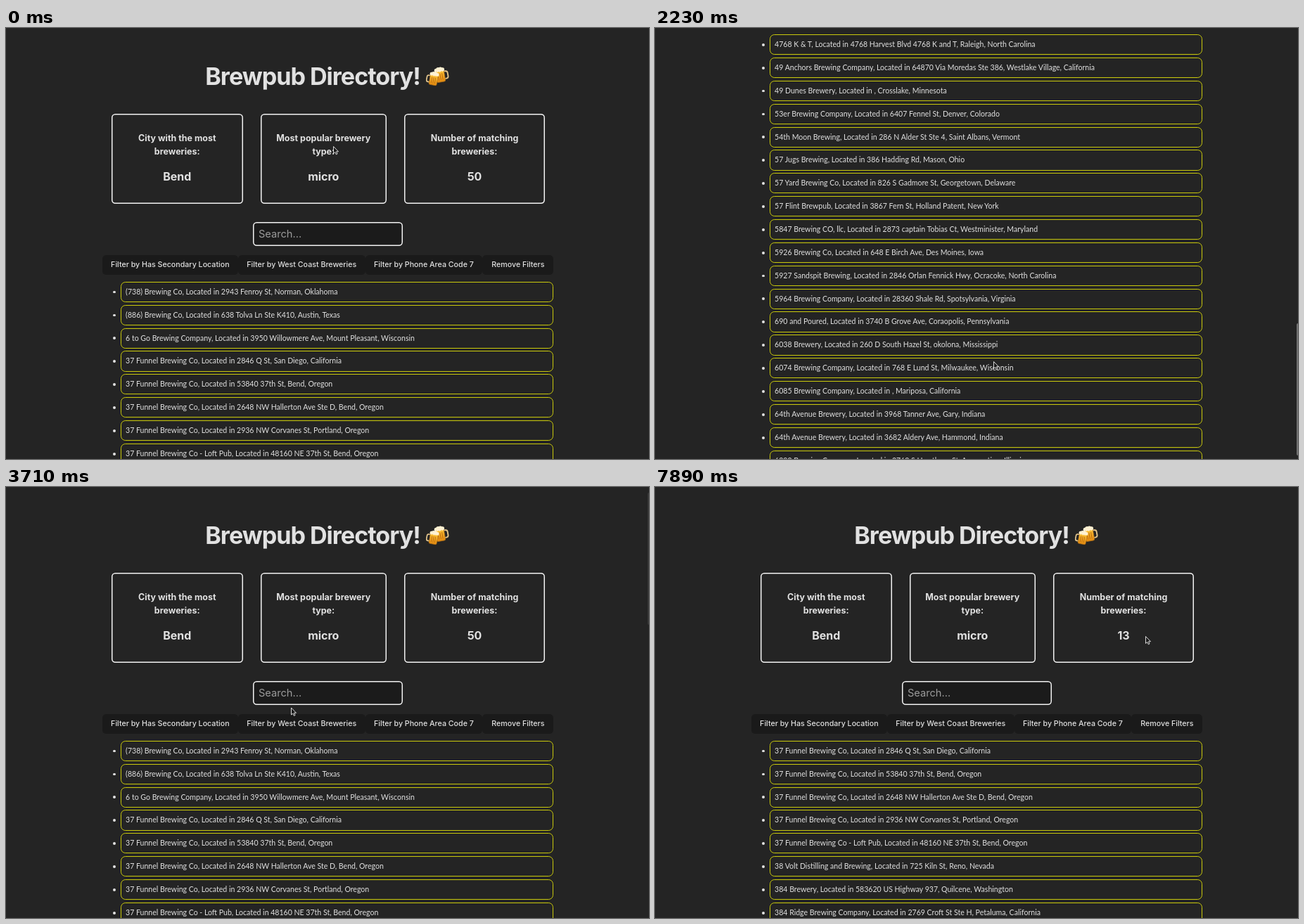
An HTML page for the animation above (8000 ms loop, 914 by 613 pixels).

```html
<!DOCTYPE html>
<html lang="en">
<head>
<meta charset="utf-8">
<title>Brewpub Directory</title>
<style>
  html, body { margin: 0; width: 100%; height: 100%; overflow: hidden; background: #242424; }
  #stage { position: relative; width: 914px; height: 613px; overflow: hidden; background: #242424;
    color: #e1e1e1; font-family: Inter, sans-serif; font-optical-sizing: none; }
  #stage * { box-sizing: border-box; }
  #page, #page div, .mugs, .top, #thumb, #cursor { position: absolute; }
  #page { left: 0; top: 0; width: 914px; }
  #page div { white-space: nowrap; }
  .title { left: 236px; width: 400px; top: 44px; line-height: 50px; text-align: center;
    font-size: 34.13px; font-weight: 700; letter-spacing: -.03em; }
  .mugs { left: 597px; top: 53px; }
  .card, .search { box-shadow: inset 0 0 0 1.5px #f2f2f2; border-radius: 5.5px; }
  .card { top: 122.3px; height: 127.8px; text-align: center; font-weight: 700; }
  .card div { left: 0; right: 0; }
  .card .label { top: 25.6px; font-size: 12.48px; line-height: 18.72px; white-space: pre-line !important; }
  .card .value { top: 76.4px; font-size: 16px; line-height: 24px; }
  .search { left: 351.3px; top: 276px; width: 213px; height: 34px; background: #1b1b1b; color: #9b9b9b;
    padding-left: 7.6px; font-size: 14.67px; line-height: 34px; }
  .button { top: 322.7px; height: 28px; border: 1px solid transparent; border-radius: 5.3px;
    background: #1a1a1a; text-align: center; font-size: 10.67px; font-weight: 500; line-height: 26px; }
  .row { left: 163.3px; width: 615.2px; height: 29.2px; border: 1px solid #c9c90c; border-radius: 6.7px;
    padding-left: 5.8px; font: 10.55px/27px Lato, sans-serif; }
  .row::before { content: ""; position: absolute; left: -12.6px; top: 11.9px; width: 3.8px; height: 3.8px;
    border-radius: 50%; background: #e1e1e1; }
  .top { left: 0; top: 0; width: 914px; height: 5px; background: #242424; }
  #thumb { left: 911.5px; width: 2.5px; height: 188px; border-radius: 2px 0 0 2px; background: #727272; }
  #cursor { left: 0; top: 0; overflow: visible; }
</style>
</head>
<body>
<div id="stage">
  <div id="page">
    <div class="title">Brewpub Directory!</div>
    <svg class="mugs" width="34" height="32">
      <defs>
        <linearGradient id="beer" x2="0" y2="1">
          <stop offset="0" stop-color="#ffc93c"/><stop offset="1" stop-color="#e2890f"/>
        </linearGradient>
        <g id="mug">
          <path d="M1 6h-3q-3 0-3 3v5q0 3 3 3h3" fill="none" stroke="#e3c58d" stroke-width="2"/>
          <path d="M0 3h13v16q0 2-2 2H2q-2 0-2-2z" fill="url(#beer)" stroke="#b4731b" stroke-width=".7"/>
          <path d="M3.5 8v10M6.5 8v10M9.5 8v10" stroke="#b9690d" stroke-width="1"/>
          <path d="M-1 4q-1-4 3-4 2-2 4.500-1 3-1 4.500 1 4 0 3 4.500-1 2-3 0-1 2.500-3 .5-2 2-4 0-4 2-5-1z" fill="#fff1d2"/>
        </g>
      </defs>
      <use href="#mug" transform="translate(24.500 3) rotate(-10) scale(-.95 .95)"/>
      <use href="#mug" transform="translate(7 9.500) rotate(10) scale(.85)"/>
    </svg>
    <div id="list"></div>
  </div>
  <div class="top"></div>
  <div id="thumb"></div>
  <svg id="cursor" width="14" height="16">
    <path id="arrow" d="M.5.5v10l2.300-2 1.500 3.300 1.700-.8-1.500-3.200h3z" fill="#1a1a1a" stroke="#eee" stroke-width=".9"/>
    <path id="hand" d="M2.500 1q1.300-1.200 1.800.5l.7 3 3 .7q1.700.5 1.400 2.300l-.8 3.500h-4L.8 7.500q.2-1.500 2.200-.2z" fill="#f4f4f4" stroke="#161616" stroke-width=".7"/>
  </svg>
</div>
<script>
const $ = id => document.getElementById(id);
const page = $('page'), list = $('list'), thumb = $('thumb');

// name | street | place
const pubs = `(738) Brewing Co|2943 Fenroy St|Norman, Oklahoma
(886) Brewing Co|638 Tolva Ln Ste K410|Austin, Texas
6 to Go Brewing Company|3950 Willowmere Ave|Mount Pleasant, Wisconsin
37 Funnel Brewing Co|2846 Q St|San Diego, California
37 Funnel Brewing Co|53840 37th St|Bend, Oregon
37 Funnel Brewing Co|2648 NW Hallerton Ave Ste D|Bend, Oregon
37 Funnel Brewing Co|2936 NW Corvanes St|Portland, Oregon
37 Funnel Brewing Co - Loft Pub|48160 NE 37th St|Bend, Oregon
37 Funnel Brewing Co|847 Pelling St|Boise, Idaho
37 Funnel Brewing Co|5290 Larkem St|Denver, Colorado
38 Volt Distilling and Brewing|725 Kiln St|Reno, Nevada
38-74 Brewing Company|620 Cobble St|Knox, Indiana
384 Brewery|583620 US Highway 937|Quilcene, Washington
384 Ridge Brewing Company|2769 Croft St Ste H|Petaluma, California
387 East Brewing Company|2860 Quarrel St|Castle Rock, Colorado
39M Brewing|3748 Tellis Rd|Parker, Colorado
39th Parish Brewing Company|846 Brannet St|Abington, Massachusetts
43 Over Brewing Company|7382 Dorrin Rd|Houston, Texas
4377 Brewery|260 Fallow St|John Day, Oregon
46 Plots Brewing Company|Uncharted Lane|Killeshin, Laois
46 Doors Brewing Company|73 Emberly Dr|Williamsville, New York
46 South Brewing Company|4820 E Tamsin Ave|Gilbert, Arizona
46 South Brewing Company|386 N Orrin St|Mesa, Arizona
468 South Brewing|7620 Corder St|Bellingham, Washington
469 Brewing|4863 Salter Rd|Jackson, Michigan
47Radian Brewing|820 Maple St|Louisville, Colorado
48 Over Brewery|8374 Harbin Rd|Crescent City, California
48 Ribbons Brewery|276 Ginnet St|Savannah, Georgia
48 Quarters Brewing|6830 Tolland Ave|Milwaukee, Wisconsin
4768 K & T|4768 Harvest Blvd 4768 K and T|Raleigh, North Carolina
49 Anchors Brewing Company|64870 Via Moredas Ste 386|Westlake Village, California
49 Dunes Brewery||Crosslake, Minnesota
53er Brewing Company|6407 Fennel St|Denver, Colorado
54th Moon Brewing|286 N Alder St Ste 4|Saint Albans, Vermont
57 Jugs Brewing|386 Hadding Rd|Mason, Ohio
57 Yard Brewing Co|826 S Gadmore St|Georgetown, Delaware
57 Flint Brewpub|3867 Fern St|Holland Patent, New York
5847 Brewing CO, llc|2873 captain Tobias Ct|Westminister, Maryland
5926 Brewing Co|648 E Birch Ave|Des Moines, Iowa
5927 Sandspit Brewing|2846 Orlan Fennick Hwy|Ocracoke, North Carolina
5964 Brewing Company|28360 Shale Rd|Spotsylvania, Virginia
690 and Poured|3740 B Grove Ave|Coraopolis, Pennsylvania
6038 Brewery|260 D South Hazel St|okolona, Mississippi
6074 Brewing Company|768 E Lund St|Milwaukee, Wisconsin
6085 Brewing Company||Mariposa, California
64th Avenue Brewery|3968 Tanner Ave|Gary, Indiana
64th Avenue Brewery|3682 Aldery Ave|Hammond, Indiana
6290 Brewing Company|2760 S Hawthorn St|Assumption, Illinois
6294 Brewing|47 Marlet St|Honolulu, Hawaii
63 Spaniels Brewing Company|382 Tilden St|Franklin, Tennessee`.split('\n').map(line => {
  const [name, street, place] = line.split('|');
  return `${name}, Located in ${street}${street ? '' : ' '}, ${place}`;
});
const views = {
  all: pubs,
  second: pubs.filter(p => /Laois$/.test(p)),
  west: pubs.filter(p => /(California|Oregon|Washington|Nevada)$/.test(p)),
};

function add(parent, cls, text, style) {
  const el = document.createElement('div');
  el.className = cls;
  el.textContent = text;
  Object.assign(el.style, style);
  parent.append(el);
  return el;
}
const span = (x, end) => ({ left: x + 'px', width: end - x + 'px' });

const cards = [
  [149.6, 337, 'City with the most\nbreweries:', 'Bend'],
  [361.8, 540.8, 'Most popular brewery\ntype:', 'micro'],
  [566, 766, 'Number of matching\nbreweries:', '50'],
].map(([x, end, label, value]) => {
  const card = add(page, 'card', '', span(x, end));
  add(card, 'label', label);
  return add(card, 'value', value);
});
add(page, 'search', 'Search...');
const buttons = [
  [136.7, 330, 'Filter by Has Secondary Location'],
  [330, 510.5, 'Filter by West Coast Breweries'],
  [510.5, 677.3, 'Filter by Phone Area Code 7'],
  [677.3, 778.5, 'Remove Filters'],
].map(([x, end, text]) => add(page, 'button', text, span(x, end)));

let shown;
function show(view) {
  if (view === shown) return;
  shown = view;
  list.textContent = '';
  views[view].forEach((text, i) => add(list, 'row', text, { top: 360.8 + i * 32.87 + 'px' }));
  cards[2].textContent = views[view].length;
}

// Screen refreshes in ticks; every key is [tick, value, ...]
const LOOP = 8000, TICK = 148.7, LEAD = 13;
const pointer = [[1, 465, 168], [3, 560, 147], [5, 682, 190], [7, 540, 400], [8, 481, 474], [17, 481, 474],
  [18, 481, 480], [20, 481, 480], [21, 460, 332], [22, 460, 332], [25, 405, 313.5], [27, 300, 332],
  [28, 224, 330], [29, 240, 341], [30, 242, 342], [35, 242, 342], [39, 320, 400], [42, 394, 440],
  [50, 394, 440], [51, 500, 300], [52, 650, 151], [53, 697, 212]];
const scroll = [[9, 0], [10, 420], [11, 1030], [12, 1330.2], [13, 1344], [14, 1331], [15, 1305],
  [16, 560], [17, -38], [18, -13], [19, -4.6], [20, -1.5], [21, 0]];
const bar = [[9, 0], [10, 1], [22, 1], [25, .25], [27, 0]];
const hover = [
  [[29, 0], [32, 1], [34, 1], [35, .22], [36, 0]],
  [[41, 0], [42, 1], [46, 1], [47, .3], [48, 0]],
];

function at(keys, n, j = 1) {
  const i = keys.findIndex(k => k[0] > n);
  if (i < 0) return keys[keys.length - 1][j];
  if (!i) return keys[0][j];
  const a = keys[i - 1], b = keys[i];
  return a[j] + (b[j] - a[j]) * (n - a[0]) / (b[0] - a[0]);
}

function draw(n) {
  show(n < 35 ? 'all' : n < 47 ? 'second' : 'west');
  const y = at(scroll, n);
  page.style.transform = `translateY(${shown === 'second' ? 104.8 : -y}px)`;
  thumb.style.top = 8 + Math.max(0, y) * .3156 + 'px';
  thumb.style.opacity = at(bar, n);
  hover.forEach((keys, i) => buttons[i].style.borderColor = `rgba(100,108,255,${at(keys, n)})`);
  const hand = n >= 29 && n < 36 || n >= 43 && n < 48;
  $('hand').style.display = hand ? '' : 'none';
  $('arrow').style.display = hand ? 'none' : '';
  $('cursor').style.transform = `translate(${at(pointer, n)}px, ${at(pointer, n, 2)}px)`;
}

const start = performance.now();
function frame() {
  draw(Math.floor(((performance.now() - start) % LOOP + LEAD) / TICK));
  requestAnimationFrame(frame);
}
frame();
</script>
</body>
</html>
```
